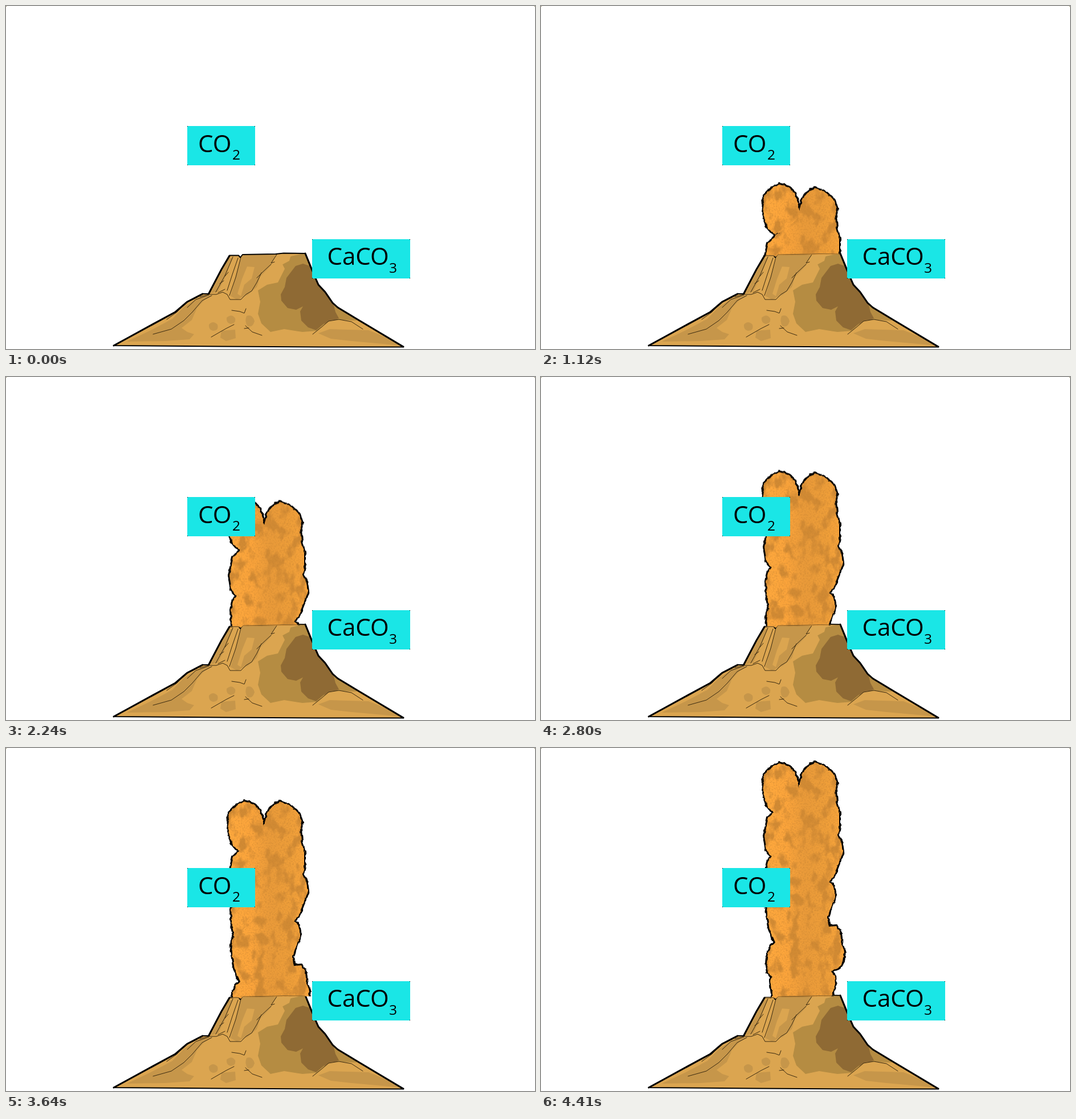
An HTML page without scripts that plays this animation: 928x603 px, repeating every 4.48 s.

```html
<!DOCTYPE html>
<html lang="en">
<head>
<meta charset="utf-8">
<title>Volcano</title>
<style>
  html, body { margin: 0; width: 100%; height: 100%; overflow: hidden; background: #fff; }
  svg { display: block; width: 100%; height: 100%; }
  text { font: 400 42px "Open Sans", "Noto Sans", sans-serif; fill: #000; }
  .sub { font-size: 24.5px; }
  .label { fill: #1ae6e6; }
  .light { fill: #dba550; }
  .mid { fill: #c6964a; }
  .dark { fill: #b58c42; }
  .deep { fill: #8f6a34; }
  .ink { fill: none; stroke: #000; stroke-linejoin: round; stroke-linecap: round; }
  .thin { stroke: #3a2a10; stroke-width: 1; }
  .rim { stroke: #80602c; stroke-width: 1; }
  .edge { fill: #000; stroke: #000; stroke-width: 6; stroke-linejoin: round; filter: url(#rough); }
  .fill { fill: url(#glow); filter: url(#lava); }

  /* 64 equal steps of 70 ms; the last one rests at 0 */
  .column, .lobe { animation: rise 4480ms steps(64, end) infinite; }
  .column { --step: 6.27px; }
  .lobe { --step: 6.1px; }
  .plume { animation: show 4480ms step-end infinite; }
  @keyframes rise {
    from { transform: translateY(calc(var(--step) * 63)); }
    to { transform: translateY(calc(var(--step) * -1)); }
  }
  @keyframes show {
    0% { opacity: 0; }
    1.5625%, 100% { opacity: 1; }
  }
</style>
</head>
<body>
<svg viewBox="0 0 928 603" xmlns="http://www.w3.org/2000/svg">
  <defs>
    <linearGradient id="glow" gradientUnits="userSpaceOnUse" x1="388" x2="530" y1="0" y2="0">
      <stop offset="0" stop-color="#ffaa3e"/>
      <stop offset=".3" stop-color="#fba43b"/>
      <stop offset=".52" stop-color="#e99a39"/>
      <stop offset=".8" stop-color="#ee9e39"/>
      <stop offset="1" stop-color="#fda73c"/>
    </linearGradient>

    <filter id="rough" filterUnits="userSpaceOnUse" x="370" y="0" width="180" height="470" color-interpolation-filters="sRGB">
      <feTurbulence type="fractalNoise" baseFrequency=".12" numOctaves="2" seed="4" result="wave"/>
      <feDisplacementMap in="SourceGraphic" in2="wave" scale="5" xChannelSelector="R" yChannelSelector="G"/>
    </filter>

    <filter id="lava" filterUnits="userSpaceOnUse" x="370" y="0" width="180" height="470" color-interpolation-filters="sRGB">
      <feTurbulence type="fractalNoise" baseFrequency=".12" numOctaves="2" seed="4" result="wave"/>
      <feDisplacementMap in="SourceGraphic" in2="wave" scale="5" xChannelSelector="R" yChannelSelector="G" result="shape"/>
      <feTurbulence type="fractalNoise" baseFrequency=".055 .035" numOctaves="3" seed="11"/>
      <feColorMatrix values="0 0 0 0 .82  0 0 0 0 .54  0 0 0 0 .2  5 0 0 0 -2.4" result="blotch"/>
      <feTurbulence type="fractalNoise" baseFrequency=".4" numOctaves="2" seed="7"/>
      <feColorMatrix values="0 0 0 0 .76  0 0 0 0 .5  0 0 0 0 .19  1.4 0 0 0 -.65" result="grain"/>
      <feMerge result="rock">
        <feMergeNode in="blotch"/>
        <feMergeNode in="grain"/>
      </feMerge>
      <feComposite in="rock" in2="shape" operator="atop"/>
    </filter>

    <clipPath id="vent">
      <path d="M0 0H928V436.500H525L416 438 412 441 408 439.500H0Z"/>
    </clipPath>

    <path id="column" d="M452 70L456 53 462 40 470 31 480 25 492 29 505 37 514 47 519 62 516 75 518 95 523 115 523 140 520 152 527 168 529 182 523 200 518 213 512 228 505 235 513 243 516 258 513 270 507 285 503 298 506 314 518 313 525 325 527 345 532 358 530 375 524 385 512 390 509 393 515 400 516 415 511 434 505 455H400L406 432 403 410 405 402 399 395 396 378 398 360 403 350 411 342 406 330 400 315 398 300 395 285 397 270 400 262 397 245 395 215 398 200 405 190 396 180 392 155 395 140 399 122 412 108 430 95 448 82Z"/>
    <path id="lobe" d="M405 33L418 27 434 31 445 42 450 58 454 75 450 98 425 110 412 114 404 110 396 100 392 86 389 75 391 60 390 50 396 43Z"/>
    <path id="hill" d="M189 597L250 563 297 538 318 520 345 506 356 506 364 490 378 463 393 438.5H408L411 442 415 437 473 436 487 434.5 525 435 533 456 541 474 548 490 560 503 573 522 582 530 620 553 697 599.5 552 599.5 378 598.5Z"/>
    <clipPath id="slope"><use href="#hill"/></clipPath>
  </defs>

  <rect width="928" height="603" fill="#fff"/>
  <path d="M0 0h1v1h-1zM927 0h1v1h-1z" fill="#786830"/>

  <g clip-path="url(#slope)">
    <use href="#hill" class="light"/>
    <path class="mid" d="M415 436H475L465 456 446 476 440 494 424 508 405 516 394 510 402 478Z
      M390 445L398 442 384 478 372 502 359 505Z
      M344 509L362 509 348 517 335 531 326 552 308 566 318 573 330 577 322 586 280 589 212 590 252 571 292 550 312 529Z
      M547 575L566 568 600 569 636 570 668 583 694 597 606 589 570 585Z
      M378 571L402 569 403 584 386 589 376 583Z
      M356 560Q363 552 371 560Q374 571 363 571Q355 569 356 560ZM387 548Q396 540 402 549Q404 558 394 559Q386 557 387 548ZM422 545Q432 541 436 554Q433 566 424 563Q418 555 422 545Z"/>
    <path class="light" d="M423 458L436 459 431 479 418 490 412 510 406 506 414 480Z"/>
    <path class="dark" d="M500 440L526 434 545 476 578 521 616 553 583 552 562 557 546 571 520 573 488 568 464 573 448 558 442 541 446 520 442 500 458 490 477 486 489 462 484 452Z"/>
    <path class="light" d="M474 437H500L497 448 482 456 468 484 447 489 443 483 463 465Z"/>
    <path class="deep" d="M508 457L521 453 533 457 548 490 560 505 574 522 578 538 584 549 572 555 557 559 544 570 530 565 518 553 516 537 521 528 509 534 494 531 483 518 482 507 489 494 492 478Z"/>
    <path class="light" d="M538 578L554 563 568 553 586 551 608 556 628 568 600 568 568 568 546 576Z"/>
  </g>

  <g class="ink thin">
    <path d="M412 442L403 477 392 509M407 443L397 472 388 500M398 441L384 474 368 503M384 475L390 468M375 488L382 483"/>
    <path d="M475 437L465 452 471 450M465 454L450 468 440 478M448 469L440 486 431 501 421 507 412 516 393 516 388 507 380 503 369 507 356 507 340 511"/>
    <path d="M356 508L333 516 318 530M361 509L344 518 327 538 312 553 290 568 258 577M336 512L314 523 300 538 282 551M372 504L384 498"/>
    <path d="M396 535L410 537 418 540 421 532M400 560L386 567 360 582M420 562L432 573 449 579M418 567L426 566M538 577L553 565 566 554 584 551 606 555 626 568"/>
  </g>
  <use href="#hill" class="ink" stroke-width="2"/>
  <path class="ink" stroke-width="3" d="M525 435L541 474 548 490 560 503 573 522 582 530 620 553 697 599M189 597L297 538 318 520 345 506M356 505L378 463 392 439"/>

  <g clip-path="url(#vent)">
    <g class="plume">
      <g class="lobe"><use href="#lobe" class="edge"/></g>
      <g class="column"><use href="#column" class="edge"/></g>
      <g class="lobe"><use href="#lobe" class="fill"/></g>
      <g class="column"><use href="#column" class="fill"/></g>
      <path class="ink rim" d="M394 438.5H408L412 441 416 437 473 436 487 435.5 524 436"/>
    </g>
  </g>

  <rect class="label" x="318" y="211" width="119" height="69"/>
  <path d="M318 211h1v1h-1zM436 211h1v1h-1zM318 279h1v1h-1zM436 279h1v1h-1z"/>
  <text x="337" y="257">CO</text>
  <text class="sub" x="397" y="270">2</text>

  <rect class="label" x="537" y="410" width="172" height="69"/>
  <path d="M537 410h1v1h-1zM708 410h1v1h-1zM537 478h1v1h-1zM708 478h1v1h-1z"/>
  <text x="563.5" y="455">CaCO</text>
  <text class="sub" x="672" y="468.5">3</text>
</svg>
</body>
</html>
```
